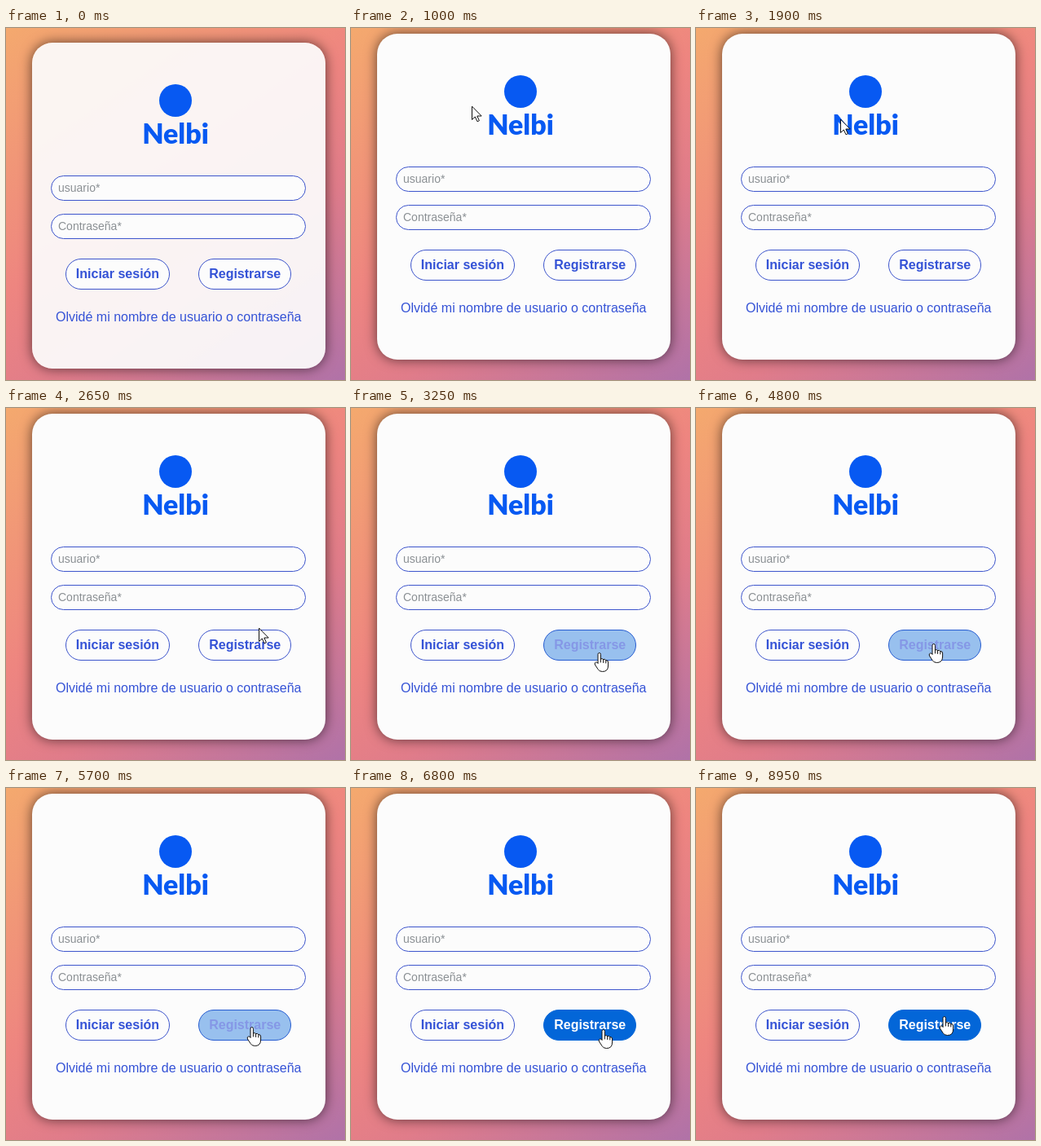
An HTML page for the animation above (9 s loop, 416 by 432 pixels).

```html
<!DOCTYPE html>
<html lang="es">
<head>
<meta charset="utf-8">
<title>Inicio de sesión</title>
<style>
  html, body { margin: 0; width: 100%; height: 100%; overflow: hidden; }
  body {
    position: relative;
    background: linear-gradient(145deg, #f4a96e, #ee8580 45%, #e07c8a 66%, #b072a8);
  }
  #panel, svg { position: absolute; left: 0; top: 0; width: 416px; height: 432px; }
  #card {
    position: absolute; left: 32px; top: 7px; width: 360px; height: 400px;
    border-radius: 25px; box-shadow: 0 0 15px rgba(0, 0, 0, .6);
  }
  text { font: 16px "Liberation Sans", Arial, sans-serif; fill: #3452d6; }
  .box { fill: #fcfcfc; stroke: #3d55cc; }
  .hint { font-size: 14px; fill: #8b9094; }
  .label { font-weight: bold; text-anchor: middle; }
  .brand { font: 900 34px Lato, sans-serif; text-anchor: middle; }
  .brand, .mark { fill: #0759f2; }
  .cursor path { stroke: #111; stroke-linejoin: round; stroke-linecap: round; }
</style>
</head>
<body>
<div id="panel">
  <div id="card"></div>
  <svg viewBox="0 0 416 432">
    <circle class="mark" cx="208" cy="78" r="20"/>
    <text class="brand" x="208" y="131">Nelbi</text>

    <rect class="box" x="55.5" y="170.5" width="312" height="30" rx="15"/>
    <text class="hint" x="64" y="190">usuario*</text>
    <rect class="box" x="55.5" y="217.5" width="312" height="30" rx="15"/>
    <text class="hint" x="64" y="237">Contraseña*</text>

    <rect class="box" x="73.5" y="272.5" width="127" height="37" rx="18.5"/>
    <text class="label" x="137" y="296">Iniciar sesión</text>
    <rect class="box" id="button" x="236.5" y="272.5" width="113" height="37" rx="18.5"/>
    <text class="label" id="buttonLabel" x="293.2" y="296">Registrarse</text>

    <text x="61" y="349">Olvidé mi nombre de usuario o contraseña</text>
  </svg>
</div>
<svg viewBox="0 0 416 432">
  <g class="cursor" id="arrow">
    <path d="M.5 .5V16.5L4.3 13L7 18.8L9.4 17.7L6.8 12H11.8Z" fill="#fff"/>
  </g>
  <g class="cursor" id="hand">
    <path d="M-2 13V2.5Q-2 .5 -.3 .5T1.4 2.5V8Q3.4 7 4.6 8.6Q6.8 7.8 7.8 9.6Q10.6 9.2 10.6 12V16Q10.6 23.5 3.5 23.5Q-.5 23.5 -2 20.5L-5.6 15Q-6.4 12.4 -4.6 12Q-3.2 11.8 -2 13Z" fill="#fff"/>
    <path d="M1.4 8V12M4.6 8.6V12.5M7.8 9.6V13" fill="none"/>
  </g>
</svg>
<script>
  const LOOP = 9000, STEP = 50;
  const [panel, card, button, label, arrow, hand] =
    ['panel', 'card', 'button', 'buttonLabel', 'arrow', 'hand']
      .map(id => document.getElementById(id));

  // The pointer glides to each stop during its time span.
  const entry = { x: 60, y: 104 };
  const stops = [
    { from: 900, to: 1000, x: 148, y: 96 },
    { from: 1000, to: 1700, x: 177, y: 112 },
    { from: 1900, to: 2650, x: 310, y: 270 },
    { from: 2650, to: 2750, x: 312, y: 307 },
    { from: 2850, to: 4800, x: 292, y: 289 },
    { from: 5150, to: 6800, x: 310, y: 296 },
    { from: 8800, to: 8950, x: 305, y: 280 }
  ];

  const ramp = (t, from, to) => Math.min(1, Math.max(0, (t - from) / (to - from)));
  const easeOut = p => 1 - (1 - p) ** 2;
  const blend = (a, b, p) => a + (b - a) * p;
  const mix = (a, b, p) => `color-mix(in srgb, ${b} ${p * 100}%, ${a})`;

  function pointerAt(t) {
    return stops.reduce((point, stop) => {
      const p = easeOut(ramp(t, stop.from, stop.to));
      return { x: blend(point.x, stop.x, p), y: blend(point.y, stop.y, p) };
    }, entry);
  }

  function draw(t) {
    const { x, y } = pointerAt(t);
    const onButton = t >= 2700;
    arrow.style.display = t >= 900 && !onButton ? '' : 'none';
    hand.style.display = onButton ? '' : 'none';
    for (const cursor of [arrow, hand])
      cursor.setAttribute('transform', `translate(${Math.round(x)} ${Math.round(y)})`);

    const raised = easeOut(ramp(t, 850, 1000));
    panel.style.transform = `translateY(${Math.round(11 * (1 - raised))}px)`;
    card.style.background = `rgba(252, 252, 252, ${blend(.93, 1, raised)})`;

    // Hovering tints the button partly, pressing it fills it.
    const tint = .4 * ramp(t, 2650, 2850) + .6 * ramp(t, 5950, 6250);
    button.style.fill = mix('#fcfcfc', '#0366d8', tint);
    button.style.stroke = mix('#3d55cc', '#0366d8', tint);
    label.style.fill = mix('#3452d6', '#fff', tint);
  }

  const start = performance.now();
  function tick() {
    const t = (performance.now() - start) % LOOP;
    draw(Math.floor(t / STEP) * STEP);
    requestAnimationFrame(tick);
  }
  tick();
</script>
</body>
</html>
```
